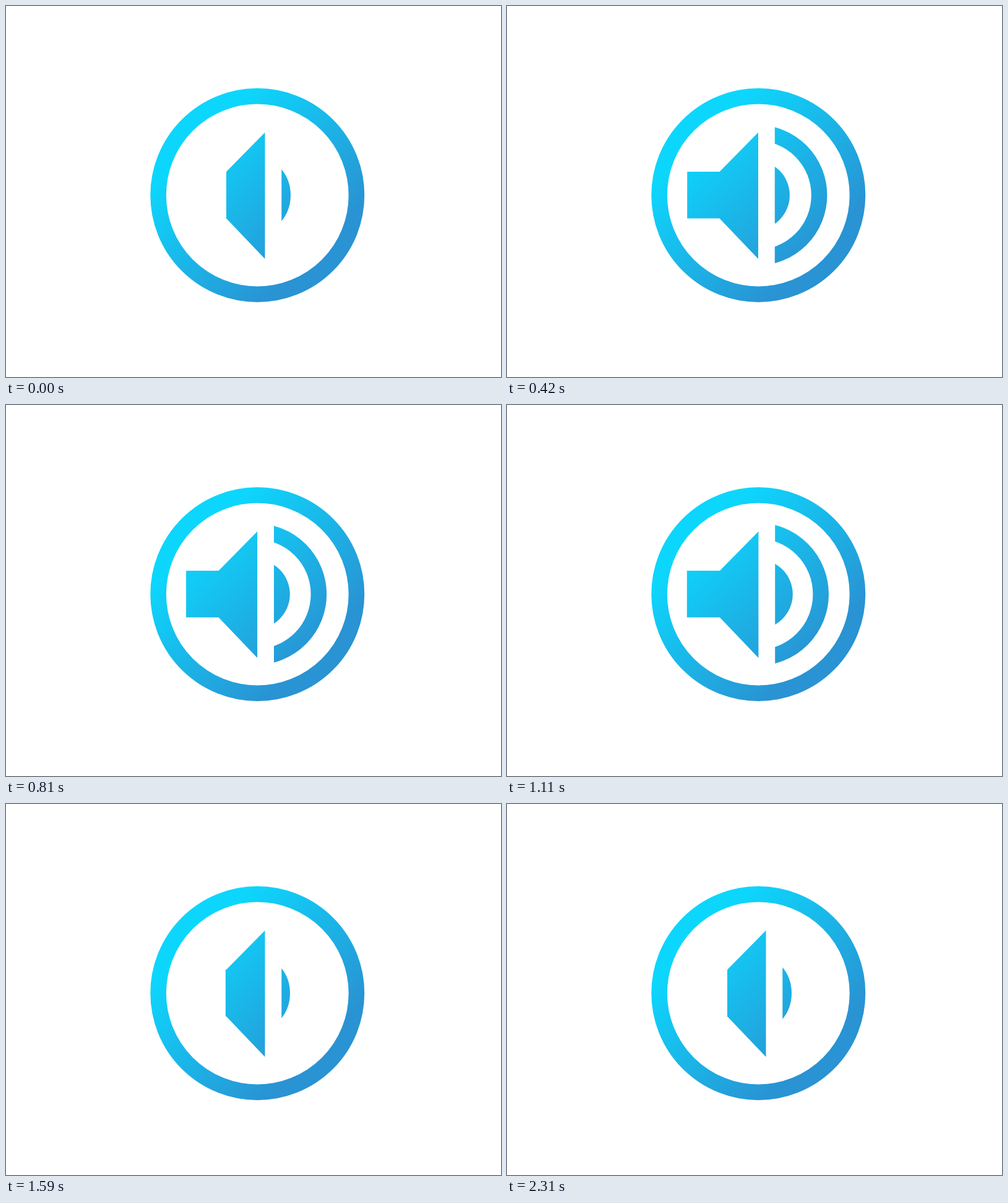
Animation, 800 px wide and 600 px high, one loop 2.37 s. Source, as an HTML page with a canvas:

```html
<!DOCTYPE html>
<html lang="en">
<head>
<meta charset="utf-8">
<title>Speaker</title>
<style>
html, body { margin: 0; width: 100%; height: 100%; overflow: hidden; background: #fff; }
canvas { display: block; }
</style>
</head>
<body>
<canvas id="stage" width="800" height="600"></canvas>
<script>
const LOOP = 2370, STEP = 30, OPEN = 180, CLOSE = 1380;
const ctx = document.getElementById('stage').getContext('2d');

const paint = ctx.createLinearGradient(314, 214, 498, 398);
paint.addColorStop(0, '#0dd6fc');
paint.addColorStop(1, '#2993d3');
ctx.fillStyle = ctx.strokeStyle = paint;

const clamp = v => Math.max(0, Math.min(1, v));
const easeOut = v => 1 - (1 - clamp(v)) ** 2;
const smooth = v => { v = clamp(v); return v * v * (3 - 2 * v); };

// A quick move to a near value, then a slow settle to the final one.
function travel(t, from, near, to, delay, span) {
  return from + (near - from) * easeOut((t - delay) / span)
    + (to - near) * smooth((t - 450) / 480);
}

// Values: closed, nearly open, open, nearly closed.
function pose(t, [closed, nearOpen, open, nearClosed], delay, span) {
  return t < CLOSE
    ? travel(t - OPEN, closed, nearOpen, open, delay, span)
    : travel(t - CLOSE, open, nearClosed, closed, delay, span);
}

function circle(x, r) {
  ctx.beginPath();
  ctx.arc(x, 306, r, 0, 2 * Math.PI);
}

function ring(x, outer) {
  ctx.lineWidth = 25.6;
  circle(x, outer - 12.8);
  ctx.stroke();
}

function speaker(left, right) {
  const neck = right - 62.5;
  left = Math.min(left, neck);
  ctx.beginPath();
  ctx.moveTo(left, 268);
  ctx.lineTo(neck, 268);
  ctx.lineTo(right, 204.5);
  ctx.lineTo(right, 409);
  ctx.lineTo(neck, 343.5);
  ctx.lineTo(left, 343.5);
  ctx.fill();
}

function draw(t) {
  const right = pose(t, [418.5, 406, 406.4, 418.5], 15, 178);
  const left = pose(t, [356, 291.2, 290.8, 355.6], 15, 218);
  const wave = pose(t, [66.6, 113.8, 115.6, 65.3], 45, 180);
  const disc = pose(t, [355, 401, 405.3, 352], 80, 180);
  const spread = (wave - 66.6) / 49;

  ctx.clearRect(0, 0, 800, 600);
  ring(406.3, 173);
  speaker(left, right);

  ctx.save();
  ctx.beginPath();
  ctx.rect(right + 26.8, 150, 200, 320);
  ctx.clip();
  ring(393.4 + 11 * spread * spread, wave);
  circle(disc, 56.5);
  ctx.fill();
  ctx.restore();
}

const start = performance.now();
function frame() {
  const t = (performance.now() - start) % LOOP;
  draw(Math.floor(t / STEP) * STEP);
  requestAnimationFrame(frame);
}
frame();
</script>
</body>
</html>
```
